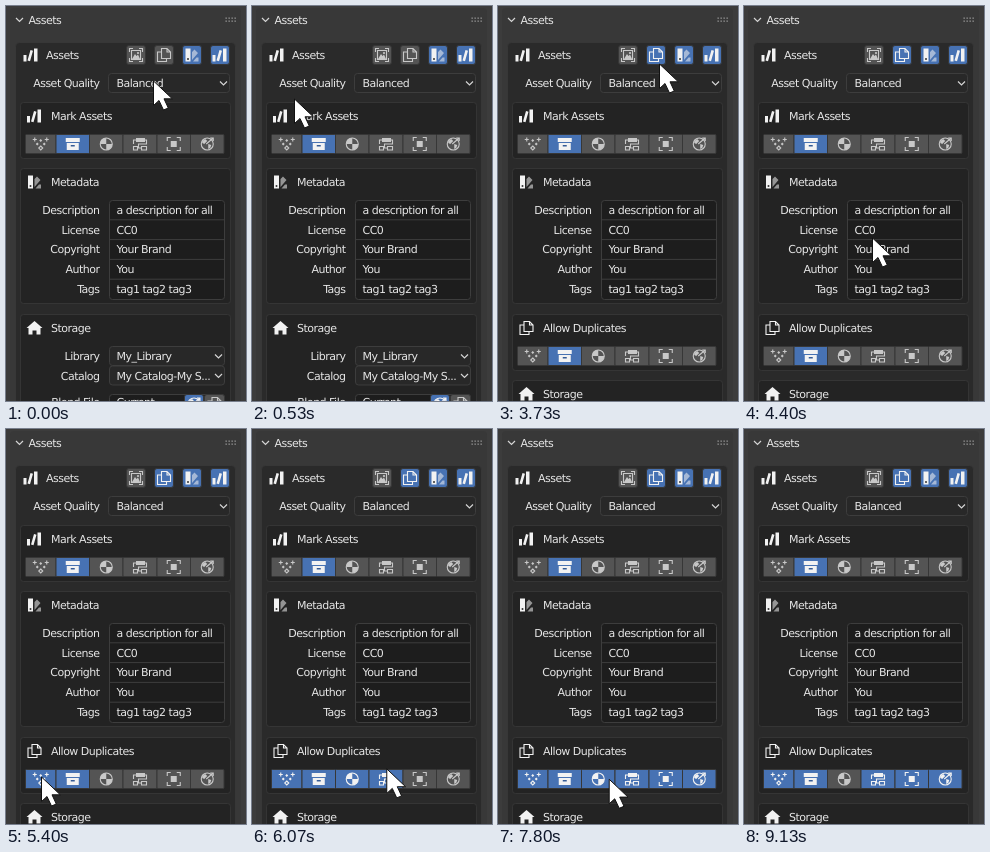
An HTML page for the animation above (9.87 s loop, 240 by 395 pixels).

```html
<!DOCTYPE html>
<html lang="en">
<head>
<meta charset="utf-8">
<title>Assets panel</title>
<style>
html, body { margin: 0; width: 100%; height: 100%; overflow: hidden; background: #3c3c3c; }
svg { display: block; width: 100vw; height: 100vh; }
text { font: 11px "DejaVu Sans", sans-serif; letter-spacing: -.5px; fill: #e6e6e6; text-rendering: geometricPrecision; white-space: pre; }
.end { text-anchor: end; }
.panel { fill: #383838; }
.box { fill: #1d1d1d; fill-opacity: .5; stroke: #3a3a3a; stroke-opacity: .75; }
.field { fill: #1d1d1d; stroke: #3d3d3d; }
.menu { fill: #282828; stroke: #3d3d3d; }
.btn rect { fill: #545454; stroke: #373737; }
.btn { color: #c8c8c8; }
.btn.hover rect { fill: #686868; }
.btn.on rect { fill: #4772b3; }
.btn.on, .icon { color: #f2f2f2; }
.line { fill: none; stroke: currentColor; stroke-width: 1.1; }
.solid { fill: currentColor; }
.chevron { fill: none; stroke: #d5d5d5; stroke-width: 1.2; }
</style>
</head>
<body>
<svg id="stage" viewBox="0 0 240 395" preserveAspectRatio="none"></svg>
<script>
const LOOP = 9870, FPS = 15;

// Icons are drawn around their own centre.
const line = d => `<path class="line" d="${d}"/>`;
const solid = d => `<path class="solid" d="${d}"/>`;
const faint = d => `<path class="solid" opacity=".55" d="${d}"/>`;
const icons = {
  books: solid('M-7.500 0h3v6.500h-3zM-3.500 5.500l3-10.500 2.500.7-3 10.500zM3-6.500h3.500v13h-3.500z'),
  image: line('M-6.500-3v-3.500h3.500M3-6.500h3.500v3.500M6.500 3v3.500h-3.500M-3 6.500h-3.500v-3.500M-4.500-4.500h9v9h-9z') +
    solid('M-4 4l3-5 1.500 2 1.500-1.500 2 4.500z') + '<circle class="solid" cx="2" cy="-2" r="1.100"/>',
  pages: line('M-2.500-6.500h5.500l3.500 3.500v6.500h-9zM3-6.500v3.500h3.500M-2.500-3h-4v9.500h9v-3'),
  swatch: solid('M-6.500-6.500h5v13h-5z') + faint('M0-3l2.500-2.500 3.500 3.500-6 7zM1 6.500l3.500-4h2v4z') +
    '<circle cx="-4" cy="4" r="1" fill="#333"/>',
  points: line('M-6-6.500v4M-8-4.500h4M6-6.500v4M4-4.500h4') +
    solid('M0-5l1.500 1.500L0-2l-1.500-1.500zM-3.500-1.500l1.500 1.500-1.500 1.500L-5 0zM3.500-1.500L5 0 3.500 1.500 2 0z') +
    line('M0 2l2 2-2 2-2-2z'),
  archive: solid('M-7-6h14v4h-14zM-6-1h12v7h-12z') + '<path d="M-2 1h4v1.500h-4z" fill="#345a94"/>',
  sphere: '<circle class="line" r="6"/>' + solid('M0-6a6 6 0 0 0-6 6h6zM0 0v6a6 6 0 0 0 6-6z'),
  nodes: solid('M-4-6h9v4h-9z') + line('M1.500 2.500h5v3.500h-5zM-6.500 2.500h4v3.500h-4zM-4-4h-2.500v4M5-4h1.500v4h-8v4h3'),
  frame: line('M-6.500-3v-3.500h3.500M3-6.500h3.500v3.500M6.500 3v3.500h-3.500M-3 6.500h-3.500v-3.500') + solid('M-3-3h6v6h-6z'),
  world: '<circle class="line" r="6"/>' + solid('M-5-3l3-2 2 2-2 2-1 1-2-1zM1 0l3 1-1 3-2 1z') +
    line('M-1 0l7-6M3-6h3v3'),
  house: solid('M0-7l8 7h-2v6.500h-4v-4h-4v4h-4V0h-2z'),
};

const icon = (name, x, y) => `<g class="icon" transform="translate(${x} ${y})">${icons[name]}</g>`;
const text = (s, x, y, cls = '') => `<text class="${cls}" x="${x}" y="${y + 4}">${s}</text>`;
const label = (s, y) => text(s, 93.5, y, 'end');
const rect = (cls, x, y, w, h, r = 3) =>
  `<rect class="${cls}" x="${x}" y="${y}" width="${w}" height="${h}" rx="${r}"/>`;
const chevron = (x, y) => `<path class="chevron" d="M${x - 3.5} ${y - 1.5}l3.500 3.500 3.500-3.500"/>`;
const button = (name, x, y, w, h, on, r = 2.5) =>
  `<g class="btn ${on ? 'on' : ''}">${rect('', x, y, w, h, r)}` +
  `<g transform="translate(${x + w / 2} ${y + h / 2})">${icons[name]}</g></g>`;
const title = (name, s, y) => icon(name, 28.5, y) + text(s, 45, y);
const menu = (s, x, y, w) =>
  rect('menu', x, y - 9.5, w, 19) + text(s, 110.5, y) + chevron(x + w - 6, y);

const kinds = ['points', 'archive', 'sphere', 'nodes', 'frame', 'world'];
const edges = [19.5, 50, 83.5, 117, 151, 184.5, 218];
const typeRow = y => kinds.map((kind, i) =>
  button(kind, edges[i], y, edges[i + 1] - edges[i], 19, i === 1, 1)).join('');

const metadata = [['Description', 'a description for all'], ['License', 'CC0'],
  ['Copyright', 'Your Brand'], ['Author', 'You'], ['Tags', 'tag1 tag2 tag3']];
const metaRows = metadata.map(([name, value], i) => {
  const y = 203.7 + i * 19.8;
  return label(name, y) + text(value, 110.5, y) +
    (i ? `<path d="M103.500 ${y - 9.7}h115" stroke="#3d3d3d"/>` : '');
}).join('');

const grip = Array.from({ length: 8 }, (_, i) =>
  `<rect x="${219.5 + i % 4 * 3}" y="${i < 4 ? 11.5 : 14.5}" width="1.300" height="1.300" fill="#9a9a9a"/>`).join('');

document.getElementById('stage').innerHTML = `
  ${rect('panel', 4, 2, 231, 410, 4)}
  ${chevron(13.5, 13.5)}${text('Assets', 22.5, 14)}${grip}
  ${rect('box', 9.5, 36.5, 220, 380, 4)}
  ${icon('books', 25, 49)}${text('Assets', 40, 49)}
  ${button('image', 120.5, 39.5, 19, 19)}
  <g id="dupToggle">${button('pages', 148.5, 39.5, 19, 19)}</g>
  ${button('swatch', 176.5, 39.5, 19, 19, true)}
  ${button('books', 204.5, 39.5, 19, 19, true)}
  ${label('Asset Quality', 77)}${menu('Balanced', 102.5, 77, 121)}
  ${rect('box', 14.5, 96.5, 210, 56)}${title('books', 'Mark Assets', 110)}${typeRow(128.5)}
  ${rect('box', 14.5, 162.5, 210, 135)}${title('swatch', 'Metadata', 176)}
  ${rect('field', 103.5, 194.5, 115, 99)}${metaRows}
  <g id="duplicates">
    ${rect('box', 14.5, 308.5, 210, 56)}${title('pages', 'Allow Duplicates', 322)}
    <g id="dupRow">${typeRow(340.5)}</g>
  </g>
  <g id="storage">
    ${rect('box', 14.5, 308.5, 210, 130)}${title('house', 'Storage', 322)}
    ${label('Library', 350)}${menu('My_Library', 103.5, 350, 115)}
    ${label('Catalog', 369.5)}${menu('My Catalog-My S...', 103.5, 369.5, 115)}
    ${label('Blend File', 396)}${rect('field', 103.5, 388.5, 115, 19)}
    ${text('Current', 110.5, 396)}
    ${button('world', 178.5, 388.5, 19, 19, true)}${button('pages', 198.5, 388.5, 20, 19)}
  </g>
  <path id="pointer" d="M.5 1V25.500L6 20.500 10.500 30 15.300 28 11 18.800H19.300Z"
    fill="#fff" stroke="#111"/>`;

// Pointer path: [step, x, y]; it rests where two neighbours agree.
const path = [[0, 147, 74], [8, 42, 92], [23, 42, 92], [28, 114, 75], [35, 162, 51], [55, 162, 51],
  [56, 161, 57], [60, 185, 115], [66, 128, 231], [70, 71, 306], [76, 35, 347], [83, 35, 347],
  [90, 120, 339], [97, 211, 342], [98, 211, 342], [102, 184, 344], [105, 180, 345], [109, 180, 345],
  [112, 112, 348], [114, 112, 348], [119, 110, 350], [133, 110, 350], [137, 106, 400], [148, 106, 400]];

const same = (a, b) => a[1] === b[1] && a[2] === b[2];
function slope(i, axis) {
  const [prev, here, next] = [path[i - 1], path[i], path[i + 1]];
  if (!prev || !next || same(prev, here) || same(here, next)) return 0;
  return (next[axis] - prev[axis]) / (next[0] - prev[0]);
}
function pointerAt(step) {
  const i = Math.max(0, path.findIndex(key => key[0] > step) - 1);
  const span = path[i + 1][0] - path[i][0], u = (step - path[i][0]) / span;
  const blend = u * u * (3 - 2 * u);
  return [1, 2].map(axis => path[i][axis] * (1 - blend) + path[i + 1][axis] * blend +
    span * u * (1 - u) * ((1 - u) * slope(i, axis) - u * slope(i + 1, axis)));
}

const OPEN = 43, CLEAR = 119, SPHERE = 2;
const onAt = [81, OPEN, 88, 90, 92, 94];
const find = selector => document.querySelector(selector);
const pointer = find('#pointer'), duplicates = find('#duplicates'), storage = find('#storage');
const dupToggle = find('#dupToggle .btn'), dupButtons = document.querySelectorAll('#dupRow .btn');

function draw(now) {
  const step = Math.min(147, Math.floor((now % LOOP + 4) * FPS / 1000));
  const [x, y] = pointerAt(step);
  const open = step >= OPEN;
  pointer.setAttribute('transform', `translate(${x} ${y})`);
  duplicates.style.visibility = open ? 'visible' : 'hidden';
  storage.setAttribute('transform', `translate(0 ${open ? 66 : 0})`);
  dupToggle.classList.toggle('on', open);
  dupToggle.classList.toggle('hover', x > 148 && x < 168 && y < 59);
  dupButtons.forEach((item, i) => {
    item.classList.toggle('on', step >= onAt[i] && !(i === SPHERE && step >= CLEAR));
    item.classList.toggle('hover', x > edges[i] && x < edges[i + 1] && y > 340 && y < 360);
  });
}

const start = performance.now();
function tick() {
  draw(performance.now() - start);
  requestAnimationFrame(tick);
}
tick();
</script>
</body>
</html>
```
